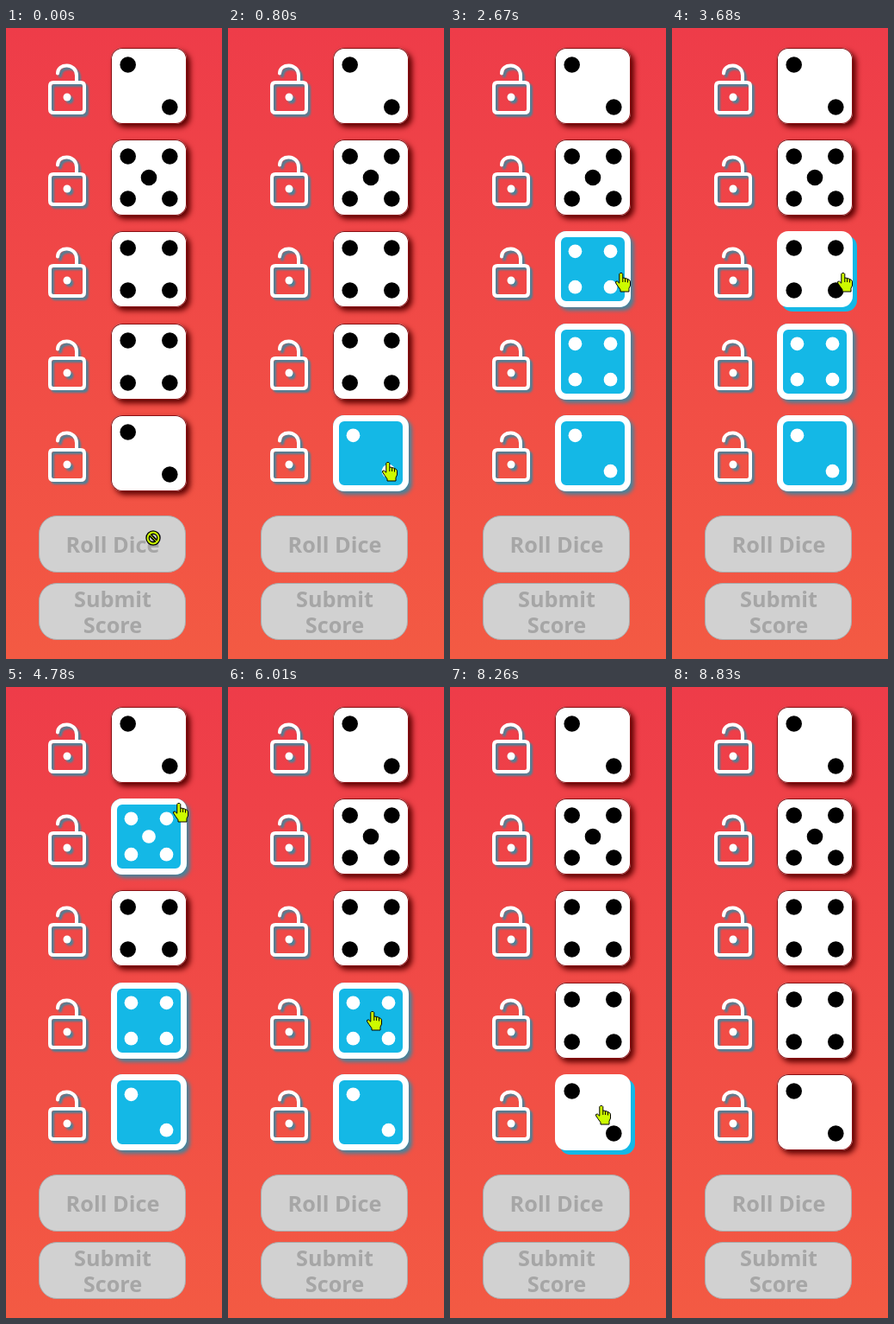
Animation of 251 by 730 pixels, one loop 9.73 s. Source, as an HTML page:

```html
<!DOCTYPE html>
<html lang="en">
<head>
<meta charset="utf-8">
<title>Dice</title>
<style>
  html, body { margin: 0; width: 100%; height: 100%; overflow: hidden; }
  #stage {
    position: relative; width: 251px; height: 730px; overflow: hidden;
    background: linear-gradient(#ee3c49, #f35a43);
  }
  svg { position: absolute; left: 0; top: 0; overflow: visible; }

  .die {
    position: absolute; left: 122px; width: 88px; height: 88px;
    border-radius: 13px; background: #fff;
  }
  .die g { fill: #000; transform: translate(44px, 44px); }
  .normal { box-shadow: inset 0 0 0 1px #8a1014, 4px 4px 6px #5c0000; }
  .hover { box-shadow: 5px 5px 0 #14b8e6; }
  .held { background: #14b8e6; box-shadow: inset 0 0 0 7px #fff, 4px 4px 4px #4c8197; }
  .held g { fill: #fff; transform: translate(44px, 44px) scale(.845); }

  .lock {
    position: absolute; left: 44px; width: 54px; height: 88px;
    filter: drop-shadow(3px 3px 1px #4c8197);
  }
  .lock path { fill: none; stroke: #fff; stroke-width: 4; stroke-linecap: round; }
  .lock circle { fill: #fff; }

  .button {
    position: absolute; box-sizing: border-box; left: 38px; width: 171px; height: 66px;
    border: 1px solid #ababab; border-radius: 21px; background: #d1d1d1;
  }
  text { font: bold 25.3px "Noto Sans", "Open Sans", sans-serif; fill: #a6a6a6; text-anchor: middle; }
  .cursor { display: none; }
</style>
</head>
<body>
<div id="stage">
  <div class="button" style="top:564px"></div>
  <div class="button" style="top:642px"></div>
  <svg width="251" height="730">
    <text x="124" y="607">Roll Dice</text>
    <text x="124" y="670">Submit</text>
    <text x="124" y="700">Score</text>
  </svg>
  <svg id="cursors" width="251" height="730" style="z-index:1">
    <g class="cursor" id="hand" fill="#cdfb00" stroke="#000" stroke-linejoin="round">
      <path d="M-1.2 .5H.8L1.8 1.6V6L4.5 6.4 7.5 7.4 9.6 8.6 10.5 10.2V15L9 18.2V22H-1V19.8L-4 15.6-6.4 12V10.4L-4.6 10-2.2 12.2V1.6Z"/>
      <path d="M1.8 6V11M4.6 6.6V11M7.5 7.6V11.5" fill="none"/>
    </g>
    <g class="cursor" id="no" fill="none">
      <circle r="6.4" stroke="#000" stroke-width="4.6"/>
      <path d="M-4.5-4.5 4.5 4.5" stroke="#000" stroke-width="4"/>
      <circle r="6.4" stroke="#cdfb00" stroke-width="2"/>
      <path d="M-4.5-4.5 4.5 4.5" stroke="#cdfb00" stroke-width="1"/>
    </g>
    <path class="cursor" id="arrow" fill="#cdfb00" stroke="#000" d="M.5 .5V16.5L4 13 6.5 18.5 9 17.5 6.6 12H11.5Z"/>
  </svg>
</div>
<script>
const LOOP = 9730;
const LOOKS = { n: 'normal', h: 'hover', s: 'held' };
const stage = document.getElementById('stage');
const cursors = [...document.querySelectorAll('.cursor')];

// Start time, state of the five dice, cursor and its hot spot.
const steps = [
  [0, 'nnnnn', 'no', 171, 590],
  [120, 'nnnnh', 'hand', 178, 522],
  [240, 'nnnnh', 'hand', 186, 502],
  [800, 'nnnns', 'hand', 186, 502],
  [1230, 'nnnhs', 'hand', 191, 369],
  [1660, 'nnnss', 'hand', 191, 369],
  [2090, 'nnhss', 'hand', 195, 322],
  [2210, 'nnhss', 'hand', 199, 283],
  [2670, 'nnsss', 'hand', 199, 283],
  [3680, 'nnhss', 'hand', 199, 283],
  [4260, 'nhnss', 'hand', 201, 205],
  [4380, 'nhnss', 'hand', 201, 134],
  [4780, 'nsnss', 'hand', 201, 134],
  [5460, 'nhnss', 'hand', 201, 134],
  [5740, 'nhnss', 'hand', 198, 140],
  [5890, 'nnhss', 'hand', 184, 255],
  [6010, 'nnnss', 'hand', 168, 375],
  [6590, 'nnnhs', 'hand', 168, 375],
  [6840, 'nnnhs', 'hand', 167, 379],
  [6990, 'nnnns', 'hand', 174, 452],
  [7110, 'nnnns', 'hand', 179, 476],
  [7700, 'nnnnh', 'hand', 179, 476],
  [8260, 'nnnnh', 'hand', 176, 484],
  [8410, 'nnnnn', 'no', 143, 623],
  [8560, 'nnnnn', 'no', 134, 680],
  [8680, 'nnnnn', 'arrow', 134, 723],
  [8830, 'nnnnn', '', 0, 0]
];

function add(className, top, html) {
  const el = document.createElement('div');
  el.className = className;
  el.style.top = top + 'px';
  el.innerHTML = html;
  return stage.appendChild(el);
}

function pips(value) {
  const spots = [[-1, -1], [1, 1]];
  if (value > 3) spots.push([1, -1], [-1, 1]);
  if (value % 2) spots.push([0, 0]);
  return spots.map(([x, y]) => `<circle cx="${x * 24.3}" cy="${y * 24.5}" r="9.3"/>`).join('');
}

const dice = [2, 5, 4, 4, 2].map((value, i) => {
  const top = Math.round(23 + 106.2 * i);
  add('lock', top, `<svg width="54" height="88">
    <path d="M16 29.5C16 17 38 17 38 32V39"/>
    <path d="M11 40H43Q47 40 47 44V71Q47 75 43 75H11Q7 75 7 71V44Q7 40 11 40Z"/>
    <circle cx="27" cy="57" r="4.5"/></svg>`);
  return add('die normal', top, `<svg width="88" height="88"><g>${pips(value)}</g></svg>`);
});

let shown;
function draw() {
  const t = performance.now() % LOOP;
  const step = steps.findLast(s => s[0] <= t);
  if (step !== shown) {
    shown = step;
    const [, states, cursor, x, y] = step;
    dice.forEach((die, i) => die.className = 'die ' + LOOKS[states[i]]);
    for (const c of cursors) {
      c.style.display = c.id === cursor ? 'inline' : 'none';
      c.setAttribute('transform', `translate(${x} ${y})`);
    }
  }
  requestAnimationFrame(draw);
}
draw();
</script>
</body>
</html>
```
